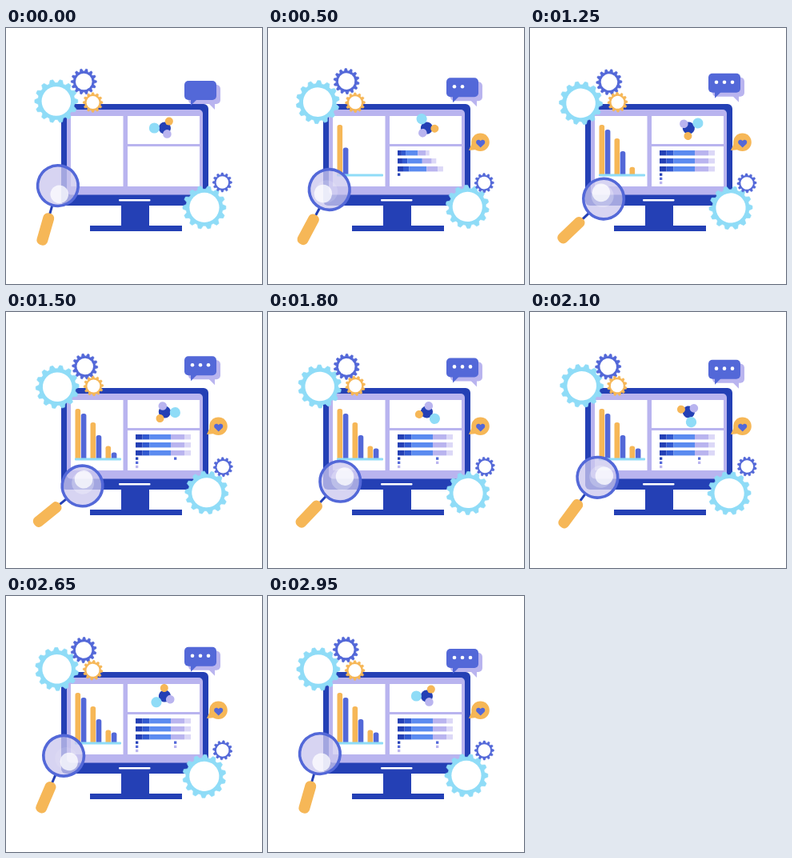
Recreate the animation shown at these times as an HTML page. Size 320 by 320 pixels, loop 3 s.

```html
<!DOCTYPE html>
<html lang="en">
<head>
<meta charset="utf-8">
<title>Data analysis</title>
<style>
  html, body { margin: 0; width: 100%; height: 100%; overflow: hidden; background: #fff; }
  svg { display: block; width: 100vw; height: 100vh; }
</style>
</head>
<body>
<svg id="stage" viewBox="0 0 320 320"></svg>
<script>
const NAVY = '#2440b5', BLUE = '#5368d8', ROYAL = '#3159d0', MID = '#5b8bf0',
      LILAC = '#b9b4ef', PALE = '#dcd8f7', SKY = '#8fdcf7', ORANGE = '#f6b757', WHITE = '#fff';
const LOOP = 3000, STEP = 50, LAST = LOOP / STEP - 1;
const stage = document.getElementById('stage');

function add(parent, tag, attrs = {}) {
  const el = document.createElementNS('http://www.w3.org/2000/svg', tag);
  for (const key in attrs) el.setAttribute(key, attrs[key]);
  parent.appendChild(el);
  return el;
}
const rect = (parent, x, y, width, height, fill, rx = 0) =>
  add(parent, 'rect', { x, y, width, height, fill, rx });
const circle = (parent, cx, cy, r, fill) => add(parent, 'circle', { cx, cy, r, fill });
const path = (parent, d, fill) => add(parent, 'path', { d, fill });
const group = (parent = stage) => add(parent, 'g');
const move = (el, value) => el.setAttribute('transform', value);
const polar = (r, deg) => {
  const a = deg * Math.PI / 180;
  return [r * Math.cos(a), r * Math.sin(a)];
};
const ramp = (t, start, length) => Math.min(1, Math.max(0, (t - start) / length));

// Each part returns its own update function (t in ms, p from 0 to 1).
const parts = [];

function monitor() {
  rect(stage, 144, 218, 35, 31, NAVY);
  rect(stage, 105, 247, 115, 7, NAVY);
  rect(stage, 69, 95, 184, 127, NAVY, 6);
  rect(stage, 76, 102, 170, 106.5, LILAC, 5);
  rect(stage, 81, 110, 65.5, 88, WHITE);
  rect(stage, 152, 110, 90, 35, WHITE);
  rect(stage, 152, 148, 90, 50, WHITE);
  rect(stage, 141, 214, 39.5, 2.5, WHITE, 1);
}

function barChart() {
  const floor = 183;
  const bars = [[86.5, 121], [93.8, 127], [105.5, 138], [112.7, 154], [124.5, 167.5], [131.8, 170.5]]
    .map(([x, top], i) => {
      const el = path(stage, '', i % 2 ? BLUE : ORANGE);
      return { el, x, full: floor - top, start: 100 + i * 250 };
    });
  const base = rect(stage, 86, floor - .5, 58, 3, SKY, 1);
  parts.push(t => {
    base.setAttribute('width', 58 * ramp(t, 0, 350));
    for (const { el, x, full, start } of bars) {
      const h = full * ramp(t, start, 250), r = Math.min(2.8, h);
      el.setAttribute('d', h ? `M${x} ${floor}v${r - h}q0 ${-r} ${r} ${-r}h${6.6 - 2 * r}q${r} 0 ${r} ${r}v${h - r}z` : '');
    }
  });
}

function stackedRows() {
  const segments = [[0, 8.5, NAVY], [8.5, 9, ROYAL], [17.5, 26.5, MID], [44, 17, LILAC], [61, 8, PALE]];
  const rows = [153, 163, 173].map(y => {
    const g = group();
    for (const [x, w, fill] of segments) rect(g, x, y, w, 6.4, fill);
    return g;
  });
  const keys = [[162, 181.5, NAVY, 400], [162, 186.7, BLUE, 750], [162, 191.8, LILAC, 1050],
                [210, 181.5, BLUE, 1350], [210, 186.7, LILAC, 1600]]
    .map(([x, y, fill, start]) => ({ el: rect(stage, x, y, 3.3, 3.3, fill), start }));
  parts.push(t => {
    rows.forEach((g, i) => move(g, `translate(162 0) scale(${ramp(t, 270 - i * 50, 400)} 1)`));
    for (const { el, start } of keys) el.setAttribute('opacity', ramp(t, start, 100));
  });
}

function molecule() {
  const g = group();
  circle(g, 0, 0, 7.6, NAVY);
  for (const [r, deg, size, fill] of [[13, 180, 6.6, SKY], [10, -57, 5, ORANGE], [8, 68, 5.3, LILAC]]) {
    circle(g, ...polar(r, deg), size, fill);
  }
  parts.push((t, p) => move(g, `translate(198.4 125) rotate(${360 * p})`));
}

// A gear turns slightly off centre: `wobble` is the distance, `phase` its first direction.
function gear(x, y, outer, root, hole, teeth, fill, dir, wobble, phase) {
  const g = group(), pitch = 360 / teeth, points = [];
  for (let i = 0; i < teeth; i++) {
    for (const [r, off] of [[root, -.36], [outer, -.15], [outer, .15], [root, .36]]) {
      points.push(polar(r, (i + off) * pitch).map(v => v.toFixed(2)).join());
    }
  }
  add(g, 'polygon', { points: points.join(' '), fill, stroke: fill, 'stroke-width': .6, 'stroke-linejoin': 'round' });
  circle(g, 0, 0, hole, WHITE);
  parts.push((t, p) => {
    const turn = dir * 360 * p, [dx, dy] = polar(wobble, phase + turn);
    move(g, `translate(${x + dx} ${y + dy}) rotate(${turn})`);
  });
}

function chat() {
  const g = group();
  rect(g, 228, 71, 40, 24, LILAC, 5);
  path(g, 'M253 94L261 102V94Z', LILAC);
  rect(g, 223, 66, 40, 24, BLUE, 5);
  path(g, 'M231 89V97L239 89Z', BLUE);
  const dots = [233, 243, 253].map(x => circle(g, x, 77, 2.3, WHITE));
  parts.push((t, p, swing) => {
    move(g, `translate(0 ${-11 * swing})`);
    dots.forEach((dot, i) => dot.setAttribute('r', 2.3 * ramp(t, 150 + i * 200, 100)));
  });
}

function like() {
  const g = group();
  circle(g, 265.5, 142.8, 11.3, ORANGE);
  path(g, 'M255 144L251 153L261 152Z', ORANGE);
  path(g, 'M265.7 149.5L261 145C258.500 142 262 137.500 265.700 141C269.400 137.500 273 142 270.400 145Z', BLUE);
  parts.push(t => move(g, `translate(251 153) scale(${ramp(t, 100, 250)}) translate(-251 -153)`));
}

function magnifier() {
  const arm = 61.2, g = group();
  rect(g, -1.5, 26, 3, 12, NAVY);
  rect(g, -7, 36, 14, 41, ORANGE, 6);
  add(g, 'circle', { r: 25.5, fill: '#cbc7ee', 'fill-opacity': .76 });
  const haze = circle(g, 0, 0, 14, WHITE), shine = circle(g, 0, 0, 11.3, WHITE);
  shine.setAttribute('opacity', .75);
  add(g, 'circle', { r: 25.3, fill: 'none', stroke: BLUE, 'stroke-width': 3.6 });
  const place = (el, [x, y]) => { el.setAttribute('cx', x); el.setAttribute('cy', y); };
  parts.push((t, p, swing) => {
    const tilt = 16 + 35.5 * swing;
    move(g, `translate(48 256) rotate(${tilt}) translate(0 ${-arm})`);
    const dir = 80 + 360 * p + 17.7 * swing - tilt;
    const reach = 8.3 + 2.5 * (1 - swing) ** 2;
    place(shine, polar(reach, dir));
    place(haze, polar(reach * .45, dir));
    haze.setAttribute('opacity', .28 * Math.sin(Math.PI * p));
  });
}

monitor();
barChart();
stackedRows();
molecule();
gear(63.5, 92.6, 27, 23, 18.3, 14, SKY, -1, 1.3, 240);
gear(98, 67.5, 16, 13, 10.3, 14, BLUE, 1, .9, 215);
gear(109, 92.8, 12.3, 10, 8, 12, ORANGE, -1, .5, 150);
gear(249.4, 225, 27, 23, 18.6, 14, SKY, 1, 1.6, 205);
gear(270.8, 193.4, 12, 9.6, 7.8, 12, BLUE, -1, .6, 220);
chat();
like();
magnifier();

function draw(now) {
  const n = Math.floor((now % LOOP) / STEP), p = n / LAST;
  const swing = 1 - Math.abs(2 * p - 1);
  for (const update of parts) update(n * STEP, p, swing);
}
const begin = performance.now();
function tick() {
  draw(performance.now() - begin);
  requestAnimationFrame(tick);
}
tick();
</script>
</body>
</html>
```
